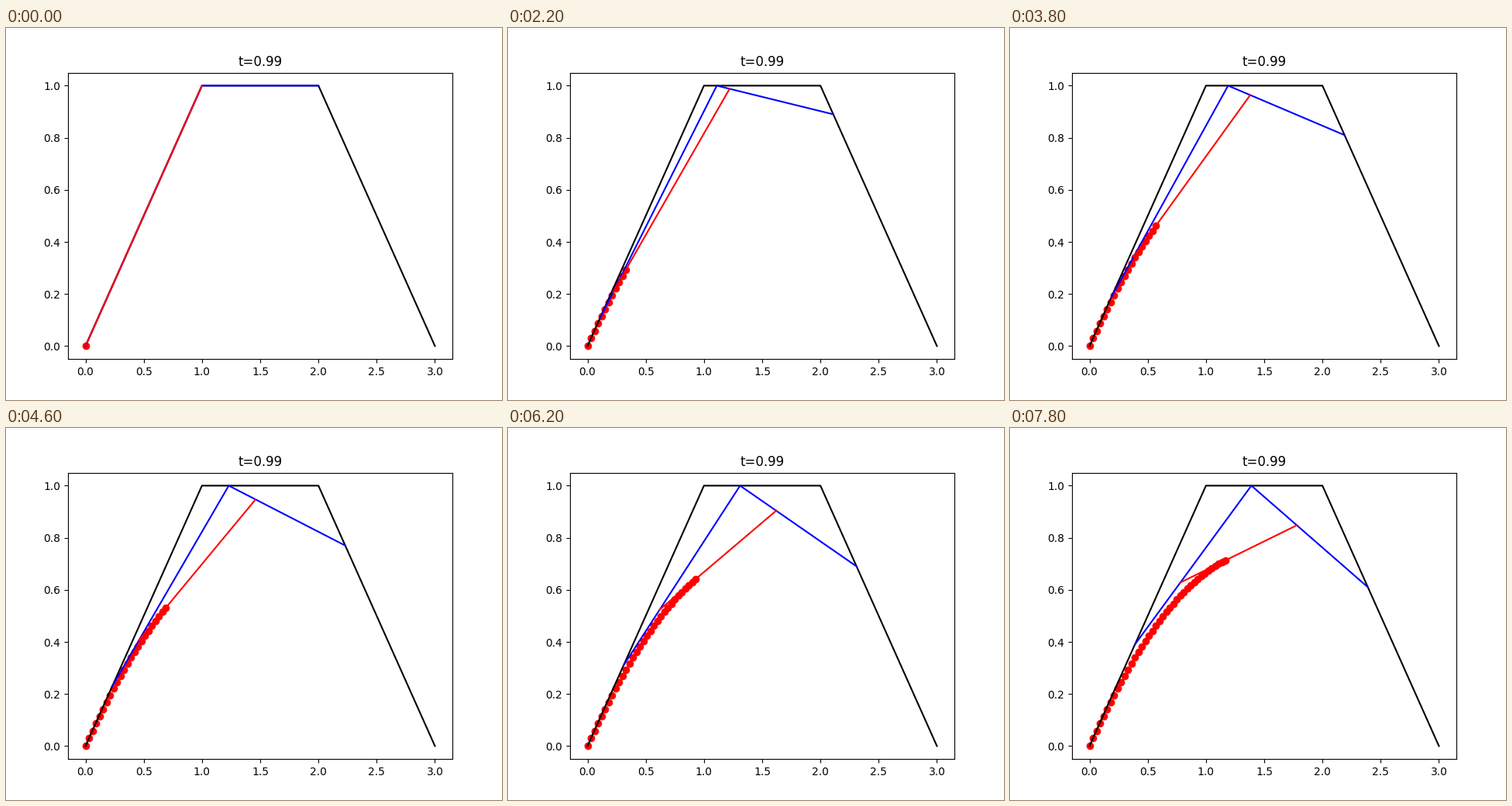
A matplotlib script that plays this animation: 640 by 480 pixels, repeating every 8 s.

```python
import numpy as np
import matplotlib.pyplot as plt
from matplotlib.animation import FuncAnimation

FRAMES = 40
INTERVAL = 200
STEP = 0.01
CONTROL = np.array([[0, 0], [1, 1], [2, 1], [3, 0]], dtype=float)


def reduce_points(points, t):
    """One de Casteljau step: interpolate between neighbouring points."""
    return (1 - t) * points[:-1] + t * points[1:]


def bezier_point(t):
    points = CONTROL
    while len(points) > 1:
        points = reduce_points(points, t)
    return points[0]


fig, ax = plt.subplots(figsize=(6.4, 4.8), dpi=100)
ax.plot(*CONTROL.T, color="black")
blue_line, = ax.plot([], [], color="blue")
red_line, = ax.plot([], [], color="red")
# The dots lie beneath all the lines
dots, = ax.plot([], [], "o", color="red", zorder=1)
ax.set_xlim(-0.15, 3.15)
ax.set_ylim(-0.05, 1.05)
ax.set_title("t=0.99")

curve = np.array([bezier_point(i * STEP) for i in range(FRAMES)])


def update(i):
    t = i * STEP
    first = reduce_points(CONTROL, t)
    second = reduce_points(first, t)
    blue_line.set_data(*first.T)
    red_line.set_data(*second.T)
    dots.set_data(*curve[:i + 1].T)
    return blue_line, red_line, dots


anim = FuncAnimation(fig, update, frames=FRAMES, interval=INTERVAL,
                     init_func=lambda: update(0), repeat=True, repeat_delay=0)
plt.show()
```
